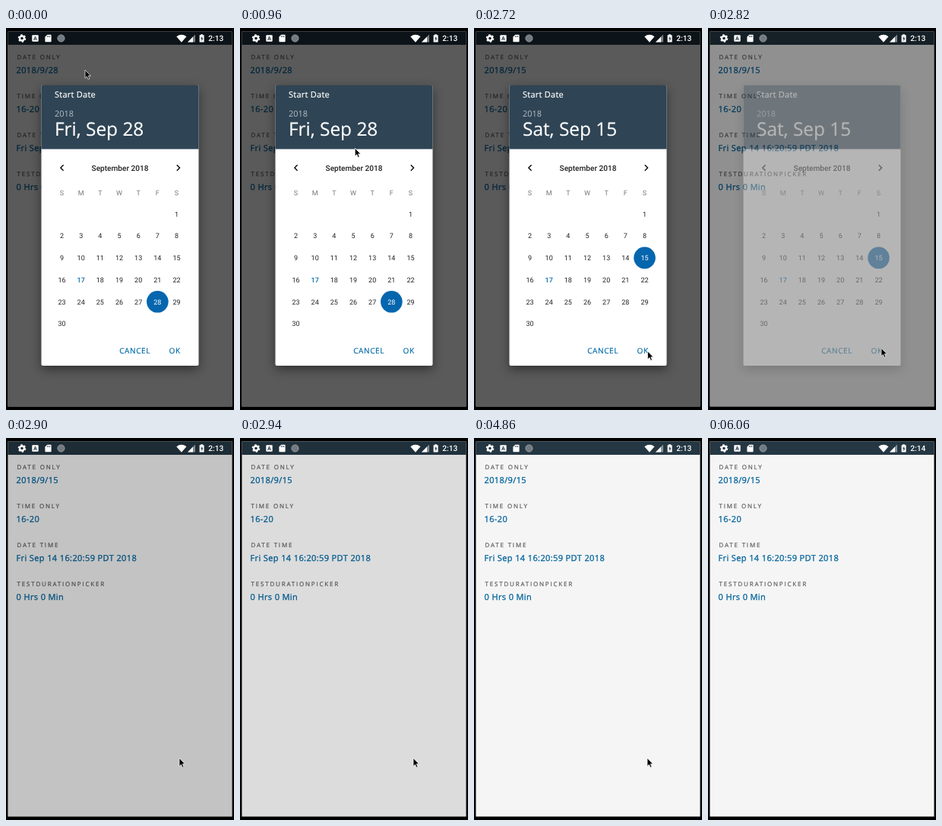
An HTML page for the animation above (6580 ms loop, 300 px wide and 500 px high).

```html
<!DOCTYPE html>
<html lang="en">
<head>
<meta charset="utf-8">
<title>Date picker</title>
<style>
  html, body { margin: 0; width: 100%; height: 100%; overflow: hidden; background: #000; }
  svg { display: block; width: 100vw; height: 100vh; }
  text { font-family: "Open Sans", "Noto Sans", sans-serif; text-rendering: geometricPrecision; white-space: pre; }
  .label { font-size: 8px; letter-spacing: 1.8px; fill: #5c5c5c; stroke: #5c5c5c; stroke-width: .2; }
  .value { font-size: 11px; letter-spacing: .38px; fill: #00639c; stroke: #00639c; stroke-width: .3; }
  .head { fill: #fff; stroke: #fff; stroke-width: .2; }
  .cal { font-family: Roboto, sans-serif; font-size: 9px; text-anchor: middle; fill: #222; }
  .week { fill: #777; }
  .today { fill: #0a6ab0; font-weight: 500; }
  .picked { fill: #fff; }
  .month { font-size: 10.1px; font-weight: 500; }
  .button { font-size: 10px; letter-spacing: .6px; fill: #0069a5; stroke: #0069a5; stroke-width: .2; }
  #clock { font-family: Roboto, sans-serif; font-size: 10.2px; font-weight: 500; fill: #fff; }
  #card { filter: drop-shadow(0 5px 7px rgba(0, 0, 0, .45)); }
</style>
</head>
<body>
<svg viewBox="0 0 300 500" preserveAspectRatio="none">
  <rect width="300" height="500"/>
  <rect x="2.500" y="4.500" width="295" height="491" fill="#f5f5f5"/>
  <rect x="2.500" y="4.500" width="295" height="17.500" fill="#243743"/>
  <g id="form"></g>
  <rect id="dim" x="2.500" y="4.500" width="295" height="491"/>

  <g id="dialog">
    <rect id="card" x="46.500" y="75" width="207" height="367" rx="2" fill="#fff"/>
    <path d="M46.500 158.500V77a2 2 0 0 1 2-2h203a2 2 0 0 1 2 2v81.500z" fill="#2f4454"/>
    <text class="head" x="64" y="91.300" font-size="11" letter-spacing=".25">Start Date</text>
    <text x="64" y="116" font-size="10.900" fill="#b5bfc6">2018</text>
    <text class="head" id="heading" x="64" y="140.500" font-size="24.400"></text>
    <path d="M75.600 179.300L71.900 183l3.700 3.700M224.800 179.300l3.700 3.700-3.700 3.700" fill="none" stroke="#111" stroke-width="1.500"/>
    <text class="cal month" x="150" y="186.700">September 2018</text>
    <circle id="dot" r="14.300" fill="#0566ae"/>
    <g id="days"></g>
    <text class="button" x="149.200" y="425.700">CANCEL</text>
    <text class="button" x="214.500" y="425.700">OK</text>
  </g>

  <g fill="#fff">
    <circle cx="21" cy="13.500" r="3" fill="none" stroke="#fff" stroke-width="2.400"/>
    <circle cx="21" cy="13.500" r="4.500" fill="none" stroke="#fff" stroke-width="1.600" stroke-dasharray="2.356 2.356"/>
    <rect x="34.300" y="9.300" width="8.400" height="8.400" rx="1"/>
    <path d="M36.600 16l1.900-5 1.900 5M37.300 14.500h2.400" fill="none" stroke="#24333d"/>
    <path d="M54.300 8.700h4.500a.8.8 0 0 1 .8.8v8a.8.8 0 0 1-.8.8h-6.600a.8.8 0 0 1-.8-.8v-5.900z"/>
    <path d="M54.300 10.200v1.800M56 10.200v1.800M57.700 10.200v1.800" stroke="#24333d" stroke-width=".8"/>
    <circle cx="72.500" cy="13.500" r="4.600" fill="#727b81" stroke="#a3aaae" stroke-width=".8"/>
    <path d="M224.300 11.200q6.600-4.800 13.200 0l-6.600 7.600z"/>
    <path d="M239 18.500l10-10v10z" opacity=".45"/>
    <path d="M239 18.500l7-7v7z"/>
    <path d="M256.300 8.200h2.600v1.100h1.700v9.300h-6v-9.300h1.700z"/>
    <path d="M258.200 10.800l-2.100 3.500h1.300v3l2-3.700h-1.200z" fill="#24333d"/>
    <text id="clock" x="266.300" y="17.300"></text>
  </g>
  <path id="cursor" d="M0 0v10.700l2.400-2.300 1.700 3.800 1.800-.8-1.600-3.700h3.200z" fill="#000" stroke="#fff" stroke-width=".7"/>
</svg>
<script>
const LOOP = 6580;
const $ = id => document.getElementById(id);

function addText(parent, x, y, cls, str) {
  const el = document.createElementNS("http://www.w3.org/2000/svg", "text");
  el.setAttribute("x", x);
  el.setAttribute("y", y);
  el.setAttribute("class", cls);
  el.textContent = str;
  return parent.appendChild(el);
}

const values = [
  ["DATE ONLY", ""],
  ["TIME ONLY", "16-20"],
  ["DATE TIME", "Fri Sep 14 16:20:59 PDT 2018"],
  ["TESTDURATIONPICKER", "0 Hrs 0 Min"],
].map(([label, value], i) => {
  const y = 41 + i * 51.1;
  addText($("form"), 14.5, y, "label", label);
  return addText($("form"), 13.5, y + 17.8, "value", value);
});

// The month starts on a Saturday, the last column.
const cellX = day => 73.5 + (day + 5) % 7 * 25.17;
const cellY = day => 243.3 + Math.floor((day + 5) / 7) * 28.75;
const dayClass = day => day === 17 ? "cal today" : "cal";

[..."SMTWTFS"].forEach((c, i) => addText($("days"), 73.5 + i * 25.17, 219.2, "cal week", c));
const days = Array.from({ length: 30 }, (_, i) =>
  addText($("days"), cellX(i + 1), cellY(i + 1) + 3.2, dayClass(i + 1), i + 1));

// Each move: start, end, from x, y, to x, y
const moves = [
  [670, 1270, 104, 55, 203, 269],
  [1400, 1740, 203, 269, 228, 293],
  [1920, 2510, 228, 293, 228.5, 423],
  [2720, 2780, 228.5, 423, 228, 419],
  [5120, 5165, 228, 419, 268, 401],
];

const clamp = v => Math.min(1, Math.max(0, v));
const ramp = (t, a, b) => clamp((t - a) / (b - a));
const smooth = p => p * p * (3 - 2 * p);

function cursorAt(t) {
  const [a, b, x0, y0, x1, y1] = moves.filter(m => t >= m[0]).pop() || moves[0];
  const p = smooth(ramp(t, a, b));
  return [x0 + (x1 - x0) * p, y0 + (y1 - y0) * p];
}

let shownDay;
function pick(day) {
  if (day === shownDay) return;
  if (shownDay) days[shownDay - 1].setAttribute("class", dayClass(shownDay));
  days[day - 1].setAttribute("class", "cal picked");
  $("dot").setAttribute("cx", cellX(day));
  $("dot").setAttribute("cy", cellY(day));
  $("heading").textContent = `${day === 15 ? "Sat" : "Fri"}, Sep ${day}`;
  shownDay = day;
}

function draw(t) {
  pick(t < 1340 ? 28 : t < 1860 ? 7 : 15);
  values[0].textContent = t < 2720 ? "2018/9/28" : "2018/9/15";
  $("clock").textContent = t < 5880 ? "2:13" : "2:14";

  $("dim").setAttribute("opacity", .63 * (1 - ramp(t, 2738, 2980)));
  $("dialog").setAttribute("opacity", 1 - ramp(t, 2735, 2865));

  $("cursor").setAttribute("transform", `translate(${cursorAt(t)})`);
  $("cursor").setAttribute("visibility", t < 5180 ? "visible" : "hidden");
}

const start = performance.now();
function tick() {
  draw((performance.now() - start) % LOOP);
  requestAnimationFrame(tick);
}
tick();
</script>
</body>
</html>
```
